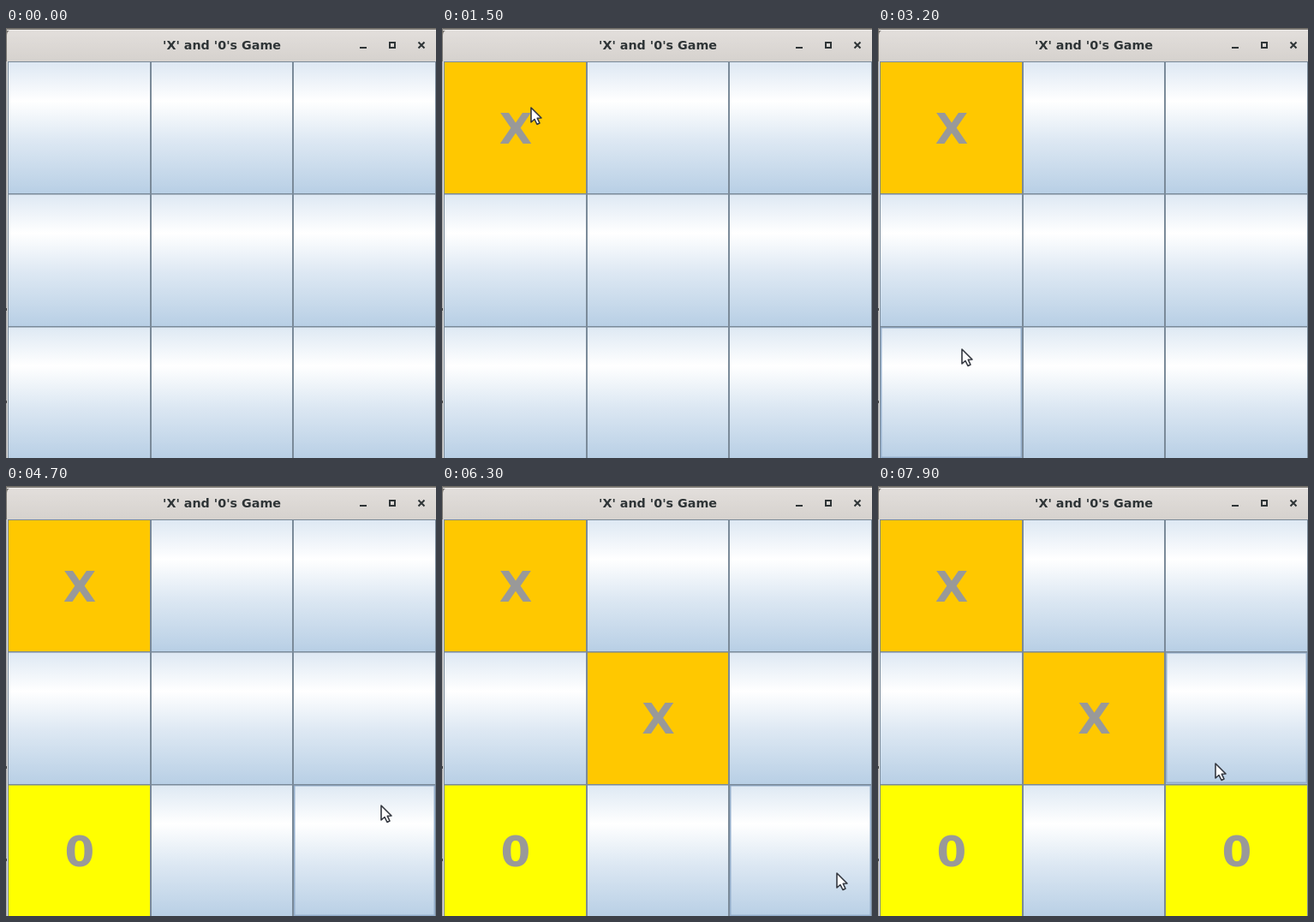
Animation of 502x502 px, one loop 8 s. Source, as an HTML page with a canvas:

```html
<!DOCTYPE html>
<html lang="en">
<head>
<meta charset="utf-8">
<title>'X' and '0's Game</title>
<style>
  html, body { margin: 0; width: 100%; height: 100%; overflow: hidden; background: #d8d8d8; }
  canvas { display: block; }
</style>
</head>
<body>
<canvas id="stage" width="502" height="502"></canvas>
<script>
const ctx = document.getElementById('stage').getContext('2d');
const LOOP = 8000, STEP = 100;
const COLS = [2, 169, 335, 502], ROWS = [39, 193, 348, 503];
const FONT = '"DejaVu Sans", Verdana, sans-serif';

// column, row, mark, time of the click
const MOVES = [
  [0, 0, 'X', 1100],
  [0, 2, '0', 3600],
  [1, 1, 'X', 5500],
  [2, 2, '0', 6700]
];

// time, x, y of the pointer tip
const PATH = [
  [200, -20, 150], [600, 104, 93], [1700, 104, 93],
  [2800, 98, 375], [3900, 98, 375], [4600, 438, 373],
  [4800, 438, 373], [5300, 268, 290], [5700, 268, 290],
  [6200, 461, 452], [6900, 461, 452], [7600, 394, 324], [8000, 394, 324]
];

function pointerAt(t) {
  if (t < PATH[0][0]) return null;
  const i = PATH.findIndex(p => t < p[0]);
  const [t0, x0, y0] = PATH[i - 1], [t1, x1, y1] = PATH[i];
  const u = (t - t0) / (t1 - t0), e = u * u * (3 - 2 * u);
  return { x: Math.round(x0 + (x1 - x0) * e), y: Math.round(y0 + (y1 - y0) * e) };
}

function rect(x, y, w, h, color) {
  ctx.fillStyle = color;
  ctx.fillRect(x, y, w, h);
}

function outline(x, y, w, h, color, width) {
  ctx.strokeStyle = color;
  ctx.lineWidth = width;
  ctx.strokeRect(x, y, w, h);
}

function gradient(y0, y1, stops) {
  const g = ctx.createLinearGradient(0, y0, 0, y1);
  stops.forEach(([at, color]) => g.addColorStop(at, color));
  return g;
}

function text(str, x, y, size, color) {
  ctx.font = `bold ${size}px ${FONT}`;
  ctx.textAlign = 'center';
  ctx.fillStyle = color;
  ctx.fillText(str, x, y);
}

function drawTitleBar() {
  rect(0, 0, 502, 39, '#77746f');
  ctx.fillStyle = gradient(1, 38, [[0, '#e3dfdc'], [1, '#d6d2ce']]);
  ctx.beginPath();
  ctx.roundRect(1, 2, 504, 37, [6, 0, 0, 0]);
  ctx.fill();
  rect(1, 2, 501, 1, '#efedeb');
  text("'X' and '0's Game", 252, 25, 14.3, '#2e3436');
  rect(413, 22, 8, 2, '#2e3436');
  outline(448, 17, 6, 6, '#2e3436', 2);
  ctx.lineWidth = 2;
  ctx.beginPath();
  ctx.moveTo(481.5, 16.5); ctx.lineTo(488.5, 23.5);
  ctx.moveTo(488.5, 16.5); ctx.lineTo(481.5, 23.5);
  ctx.stroke();
}

function drawCell(c, r, t, pointer) {
  const x = COLS[c], y = ROWS[r], w = COLS[c + 1] - x, h = ROWS[r + 1] - y;
  const move = MOVES.find(m => m[0] === c && m[1] === r && t >= m[3]);
  if (move) {
    rect(x, y, w, h, move[2] === 'X' ? '#ffc800' : '#ffff00');
    text(move[2], x + w / 2 + 0.5, y + 96, 50, '#999999');
    return;
  }
  rect(x, y, w, h, gradient(y, y + h,
    [[0, '#dde8f3'], [0.3, '#ffffff'], [0.6, '#dde8f3'], [1, '#b8cfe5']]));
  const over = pointer && pointer.x >= x && pointer.x < x + w && pointer.y >= y && pointer.y < y + h;
  if (over) outline(x + 1.5, y + 1.5, w - 3, h - 3, '#94aecb', 2);
}

function drawGrid() {
  for (let i = 0; i < 3; i++) {
    rect(COLS[i] - (i ? 1 : 0), 39, i ? 2 : 1, 463, '#7a8a99');
    rect(2, ROWS[i], 500, i ? 1.5 : 1, '#7a8a99');
  }
  rect(501, 39, 1, 463, '#7a8a99');
}

function drawPointer({ x, y }) {
  const pts = [[0, 0], [0, 17], [4, 13.5], [7, 19.5], [10, 18], [7.3, 12.3], [12, 12]];
  ctx.beginPath();
  pts.forEach(([px, py]) => ctx.lineTo(x + px, y + py));
  ctx.closePath();
  ctx.fillStyle = '#ffffff';
  ctx.fill();
  ctx.strokeStyle = '#343840';
  ctx.lineWidth = 1.6;
  ctx.lineJoin = 'round';
  ctx.stroke();
  ctx.lineJoin = 'miter';
}

function draw(t) {
  const pointer = pointerAt(t);
  rect(0, 0, 502, 502, '#e4e4e4');
  rect(0, 39, 1, 463, '#a3a3a3');
  rect(0, 327, 1, 3, '#333333');
  rect(0, 435, 1, 3, '#333333');
  drawTitleBar();
  for (let r = 0; r < 3; r++)
    for (let c = 0; c < 3; c++) drawCell(c, r, t, pointer);
  drawGrid();
  if (pointer) drawPointer(pointer);
}

const start = performance.now();
function tick() {
  const t = (performance.now() - start) % LOOP;
  draw(Math.floor(t / STEP) * STEP);
  requestAnimationFrame(tick);
}
tick();
</script>
</body>
</html>
```
